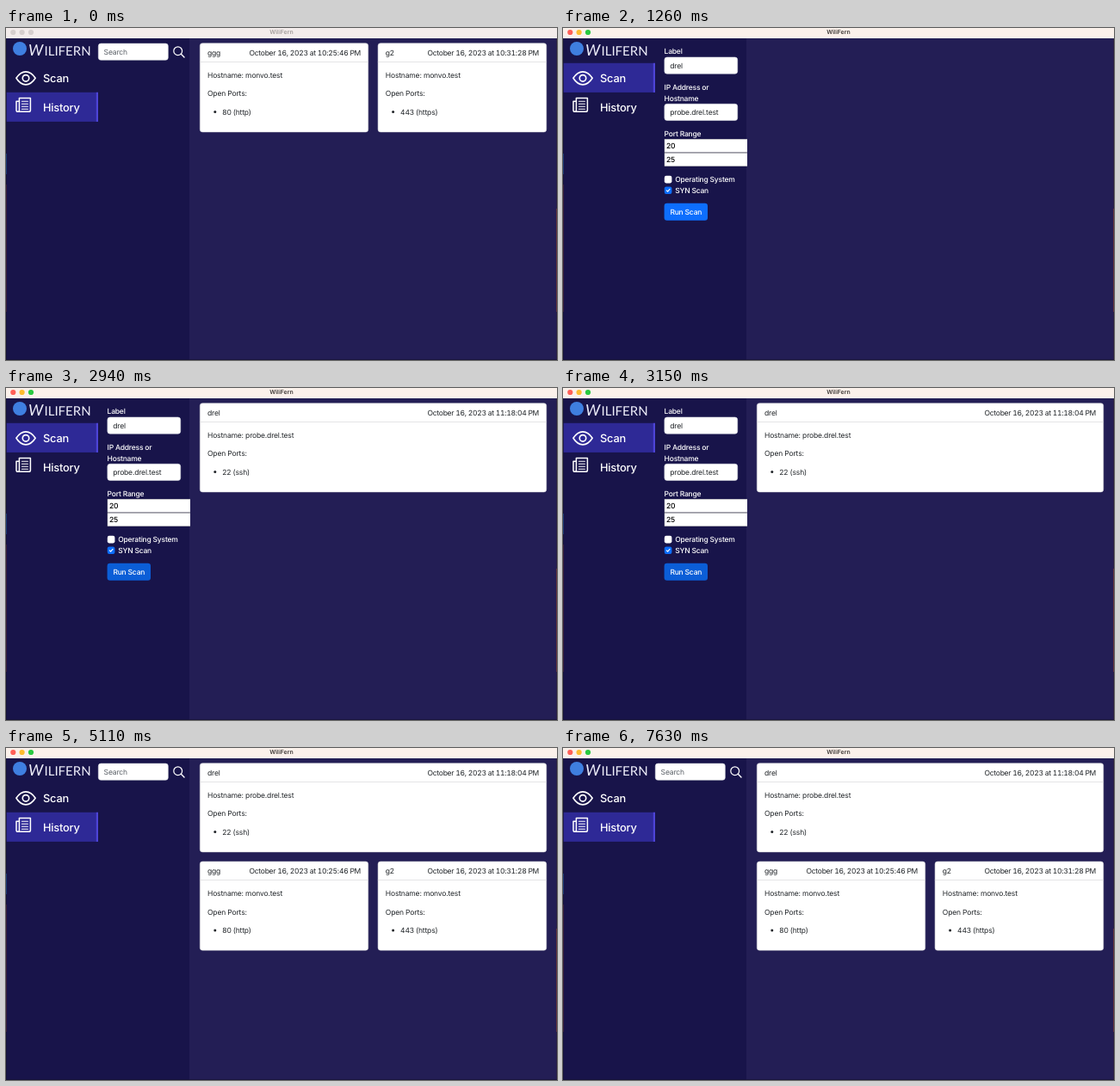
Recreate the animation shown at these times as an HTML page. Size 640x386 px, loop 7980 ms.

```html
<!DOCTYPE html>
<html lang="en">
<head>
<meta charset="utf-8">
<title>WiliFern</title>
<style>
  html, body { margin: 0; width: 100%; height: 100%; overflow: hidden; background: #231e55; }
  svg { display: block; width: 640px; height: 386px; }
  text { font: 8.53px Inter, "Open Sans", sans-serif; letter-spacing: -.17px; fill: #212529; text-rendering: geometricPrecision; white-space: pre; }
  .light { fill: #fff; font-weight: 500; letter-spacing: -.22px; }
  .nav { font-size: 12.8px; font-weight: 450; letter-spacing: -.2px; fill: #fff; }
  .title { font-size: 6.93px; font-weight: 600; letter-spacing: 0; text-anchor: middle; }
  .mark { font-family: Lato, sans-serif; font-size: 15px; letter-spacing: 0; fill: #eeeefa; }
  .hint { fill: #595f66; }
  .date { text-anchor: end; font-variant-numeric: tabular-nums; letter-spacing: -.27px; }
  .number { fill: #000; font-weight: 500; }
  .mid { text-anchor: middle; }
  .icon { fill: none; stroke: #fff; stroke-width: 1.5; stroke-linecap: round; stroke-linejoin: round; }
</style>
</head>
<body>
<svg id="stage" viewBox="0 0 640 386" xmlns="http://www.w3.org/2000/svg"></svg>
<script>
const LOOP = 7980;
const FOCUS = 1050, SCAN = 1260, HOVER_IN = 2030, RESULT = 2730, HOVER_OUT = 4200, HISTORY = 5110;
const FADE = 150;
const BLUE = [13, 110, 253], DEEP = [11, 94, 215];
const LABEL = 'drel', HOST = 'probe.drel.test', OTHER = 'monvo.test';

const rect = (x, y, w, h, fill, rx = 0, extra = '') =>
  `<rect x="${x}" y="${y}" width="${w}" height="${h}" fill="${fill}" rx="${rx}" ${extra}/>`;
const text = (x, y, s, cls = '') => `<text x="${x}" y="${y}" class="${cls}">${s}</text>`;
const group = (id, body) => `<g id="${id}">${body}</g>`;
const icon = (d, width = 1.5) => `<path class="icon" style="stroke-width:${width}" d="${d}"/>`;
const panel = (x, y, w, h, edge) =>
  rect(x + .27, y + .27, w - .54, h - .54, '#fff', 3, `stroke="${edge}" stroke-width=".53"`);
const field = (x, y, w, value, cls = '') =>
  panel(x, y, w, 19.8, '#dee2e6') + text(x + 6.6, y + 13, value, cls);
const number = (y, value) =>
  rect(117.6, y, 96.4, 15.8, '#6c6c76') + rect(118, y + .4, 96, 15, '#fff') +
  text(120, y + 11, value, 'number');

function card(x, y, w, label, time, host, port) {
  return panel(x, y, w, 103.8, '#d2d2d6') +
    rect(x, y + 21.6, w, .6, '#d2d2d6') +
    text(x + 9, y + 14.4, label) +
    text(x + w - 9, y + 14.4, `October 16, 2023 at ${time} PM`, 'date') +
    text(x + 9, y + 40.6, `Hostname: ${host}`) +
    text(x + 9, y + 61.9, 'Open Ports:') +
    `<circle cx="${x + 17.8}" cy="${y + 80.2}" r="1.5" fill="#212529"/>` +
    text(x + 26.3, y + 83.1, port);
}

const eye =
  '<g transform="translate(11 46.3) scale(1.5)">' +
  icon('M.6 8C2.5 5 5 3 8 3S13.5 5 15.4 8C13.5 11 11 13 8 13S2.5 11 .6 8Z', 1.1) +
  '<circle class="icon" cx="8" cy="8" r="2.5" style="stroke-width:1.1"/></g>';

const paper =
  icon('M15.4 95.5V81.4H28.4V95.5Q28.4 97.3 26.6 97.3H13.7Q15.4 97.3 15.4 95.5M15.4 85.2H12V95.5Q12 97.3 13.7 97.3') +
  icon('M18.4 85.2H25.4M18.4 88.2H25.4M18.4 91.2H25.4M18.4 94.2H25.4', 1.1);

const sidebar =
  rect(0, 12, 213, 374, '#18144a') +
  '<circle cx="16" cy="24" r="8" fill="#3f7fe0"/>' +
  '<text class="mark" x="26" y="32" style="font-size:18px;font-style:italic">W</text>' +
  text(44.5, 32, 'ILIFERN', 'mark') +
  group('pick', rect(0, 40.8, 107, 34.1, '#2e2996') + rect(104.8, 40.8, 2.2, 34.1, '#4d44d6')) +
  eye + paper +
  text(43, 63.3, 'Scan', 'nav') + text(43, 97.4, 'History', 'nav');

const search =
  field(107, 17.8, 81.6, 'Search', 'hint') +
  '<circle class="icon" cx="199.7" cy="26.7" r="4.9" style="stroke-width:1.2"/>' +
  icon('M203.3 30.3L207 34', 1.4);

const form =
  text(117.6, 30.2, 'Label', 'light') + field(117.6, 33.7, 85.4, LABEL) +
  text(117.6, 71.8, 'IP Address or', 'light') + text(117.6, 84.6, 'Hostname', 'light') +
  field(117.6, 88, 85.4, HOST) +
  text(117.6, 126, 'Port Range', 'light') + number(129, 20) + number(145.1, 25) +
  rect(117.8, 171.8, 8.6, 8.6, '#fff', 2.1) + text(130.2, 179.1, 'Operating System', 'light') +
  rect(117.8, 184.4, 8.6, 8.6, '#0d6efd', 2.1) + icon('M120.3 188.8L121.6 190.1L124 187.4', 1.1) +
  text(130.2, 191.8, 'SYN Scan', 'light') +
  rect(117.6, 203.8, 50.4, 20, '#0d6efd', 3.2, 'id="run"') +
  text(142.8, 216.8, 'Run Scan', 'light mid');

const titlebar =
  rect(0, 0, 640, 12, '#fbf1eb', 0, 'id="bar"') +
  [8.3, 18.6, 29].map(x => `<circle class="dot" cx="${x}" cy="5" r="3.1"/>`).join('') +
  '<text id="name" class="title" x="320" y="7.3">WiliFern</text>';

// Slivers of desktop around the window
const edges =
  rect(0, 12, .7, 374, '#151233') + rect(0, 146, .7, 24, '#1d4c8c') + rect(0, 182, .7, 148, '#4a2438') +
  rect(639.3, 12, .7, 374, '#2b1d3c') + rect(639.3, 210, .7, 120, '#7a3b3a') +
  rect(0, 385.3, 640, .7, '#151233');

document.getElementById('stage').innerHTML =
  rect(213, 12, 427, 374, '#231e55') + sidebar +
  group('search', search) + group('form', form) +
  group('fresh', card(225, 17.4, 403, LABEL, '11:18:04', HOST, '22 (ssh)')) +
  group('past',
    card(225, 17.4, 196, 'ggg', '10:25:46', OTHER, '80 (http)') +
    card(431.8, 17.4, 196.2, 'g2', '10:31:28', OTHER, '443 (https)')) +
  edges + titlebar;

const el = id => document.getElementById(id);
const show = (id, on) => el(id).setAttribute('display', on ? 'inline' : 'none');
const ramp = (t, start) => {
  const p = Math.min(1, Math.max(0, (t - start) / FADE));
  return p * p * (3 - 2 * p);
};
const dots = [...document.querySelectorAll('.dot')];
const lights = ['#ff5f57', '#febc2e', '#28c840'];

function draw(t) {
  const focused = t >= FOCUS;
  const scanning = t >= SCAN && t < HISTORY;
  const found = t >= RESULT;

  el('bar').setAttribute('fill', focused ? '#fbf1eb' : '#f3eceb');
  el('name').style.fill = focused ? '#3d3836' : '#a39d9c';
  dots.forEach((d, i) => d.setAttribute('fill', focused ? lights[i] : '#d6cfce'));

  el('pick').setAttribute('transform', `translate(0 ${scanning ? 0 : 34})`);
  show('search', !scanning);
  show('form', scanning);
  show('past', !scanning);
  show('fresh', found);
  el('past').setAttribute('transform', `translate(0 ${found ? 114.3 : 0})`);

  const hover = ramp(t, HOVER_IN) - ramp(t, HOVER_OUT);
  const mix = BLUE.map((c, i) => Math.round(c + (DEEP[i] - c) * hover));
  el('run').setAttribute('fill', `rgb(${mix})`);
}

const start = performance.now();
function tick(now) {
  draw(Math.max(0, now - start) % LOOP);
  requestAnimationFrame(tick);
}
draw(0);
requestAnimationFrame(tick);
</script>
</body>
</html>
```
